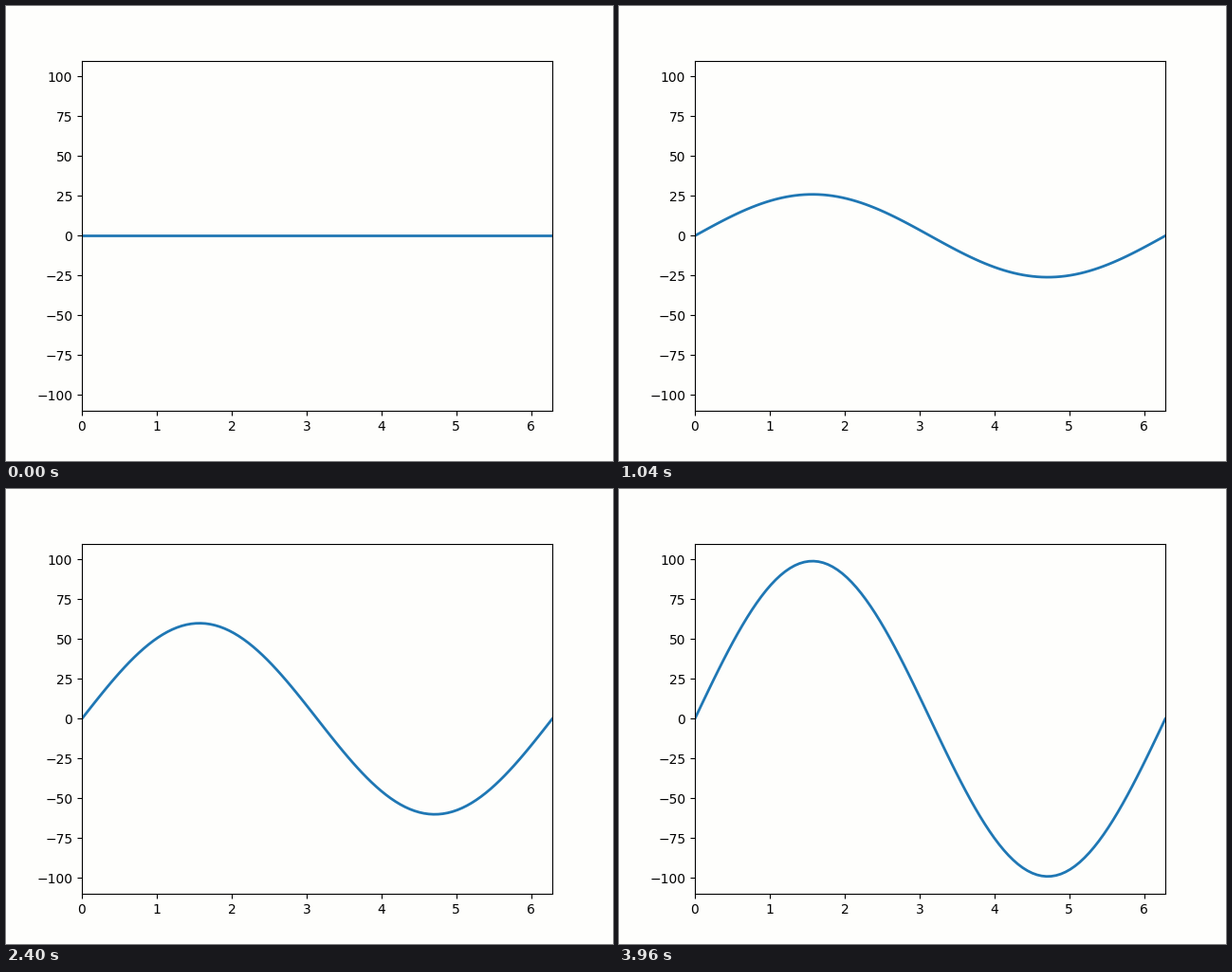
These frames come from a looping animation (640 by 480 pixels, 4000 ms). A matplotlib script:

```python
import numpy as np
import matplotlib.pyplot as plt
from matplotlib.animation import FuncAnimation

FRAMES = 100
INTERVAL = 40  # ms
LIMIT = 110
PAPER = "#fefefc"

plt.rcParams["font.family"] = "DejaVu Sans"

fig, ax = plt.subplots(figsize=(6.4, 4.8), dpi=100, facecolor=PAPER)
ax.set_facecolor(PAPER)
ax.set_xlim(0, 2 * np.pi)
ax.set_ylim(-LIMIT, LIMIT)

x = np.linspace(0, 2 * np.pi, 100)
wave = np.sin(x)
line, = ax.plot(x, 0 * x, color="#1f77b4", lw=2)


def init():
    line.set_ydata(0 * wave)
    return line,


def update(amplitude):
    """The sine's amplitude grows by one unit per frame."""
    line.set_ydata(amplitude * wave)
    return line,


anim = FuncAnimation(fig, update, frames=FRAMES, init_func=init,
                     interval=INTERVAL, repeat=True, repeat_delay=0)

plt.show()
```
